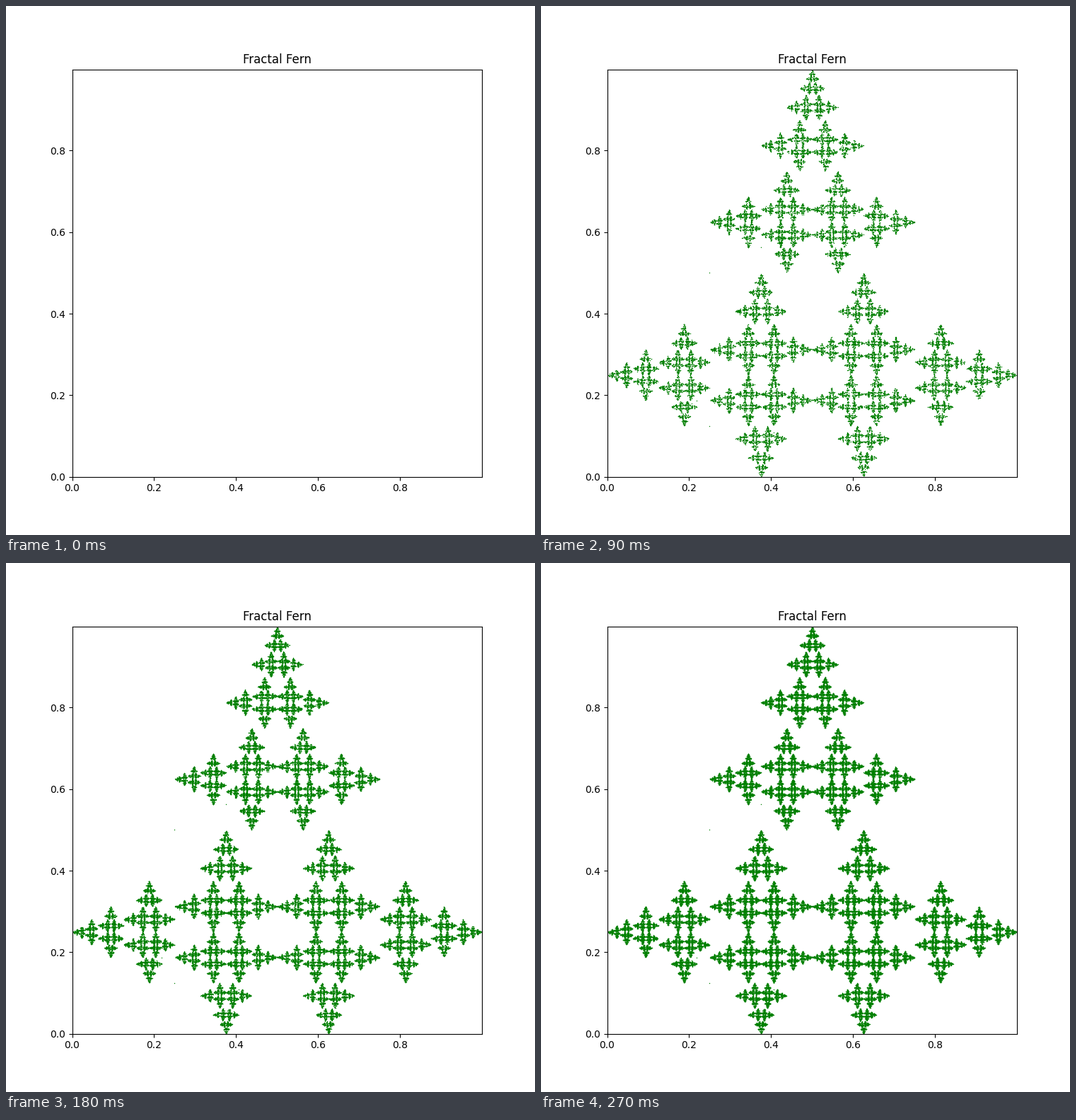
Animation, 748 px wide and 748 px high, one loop 300 ms. Source, as a matplotlib script:

```python
import random

import numpy as np
import matplotlib.pyplot as plt
from matplotlib.animation import FuncAnimation

SIZE, DPI = 748, 100
FRAMES, INTERVAL = 10, 30
POINTS_PER_FRAME = 10000


def left(x, y):
    return 0.5 - 0.5 * y, 0.5 * x


def right(x, y):
    return 0.5 + 0.5 * y, 0.5 - 0.5 * x


def top(x, y):
    return 0.25 + 0.5 * x, 0.5 + 0.5 * y


def chaos_game(count):
    """Points of the attractor, visited in random order from the origin."""
    rng = random.Random(7)
    maps = (left, right, top)
    opening = (top, left, top, left, left)
    points = [(0.0, 0.0)]
    for i in range(count - 1):
        step = opening[i] if i < len(opening) else rng.choice(maps)
        points.append(step(*points[-1]))
    return np.array(points).T


xs, ys = chaos_game(FRAMES * POINTS_PER_FRAME)

fig, ax = plt.subplots(figsize=(SIZE / DPI, SIZE / DPI), dpi=DPI)
ax.set_title("Fractal Fern")
ax.set_xlim(0, 0.9995)
ax.set_ylim(0, 0.999)
ax.set_xticks(np.arange(5) * 0.2)
ax.set_yticks(np.arange(5) * 0.2)
dots, = ax.plot([], [], "o", color="green", markersize=1, markeredgewidth=0)


def update(frame):
    shown = frame * POINTS_PER_FRAME
    dots.set_data(xs[:shown], ys[:shown])
    return (dots,)


anim = FuncAnimation(fig, update, frames=FRAMES, interval=INTERVAL,
                     repeat=True, repeat_delay=0)
plt.show()
```
